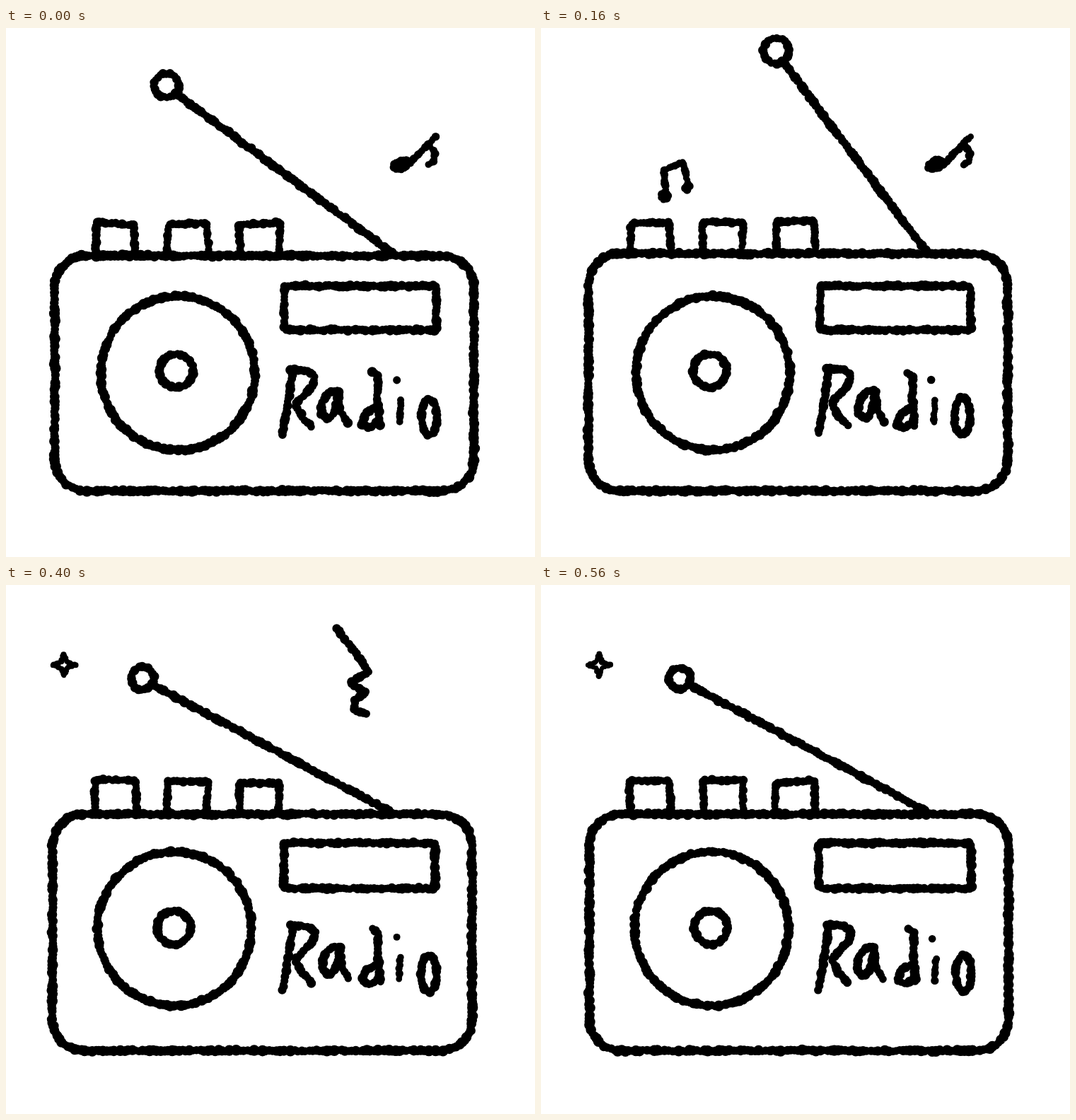
These frames come from a looping animation (748 px wide and 748 px high, 0.64 s). An HTML page with a canvas:

```html
<!DOCTYPE html>
<html lang="en">
<head>
<meta charset="utf-8">
<title>Radio</title>
<style>
html, body { margin: 0; width: 100%; height: 100%; overflow: hidden; background: #fff; }
canvas { display: block; width: 100vw; height: 100vh; }
</style>
</head>
<body>
<canvas id="stage" width="748" height="748"></canvas>
<script>
const ctx = document.getElementById("stage").getContext("2d");
const POSE_MS = 80, POSES = 8;

// Strokes of the hand lettering, each as x, y, x, y, ...
const LETTERS = [
  [[406, 486, 401, 520, 392, 574], [404, 482, 426, 483, 438, 491, 435, 504, 410, 531, 420, 549, 434, 564]],
  [[470, 512, 458, 514, 448, 529, 447, 545, 457, 553, 466, 543, 472, 513, 474, 540, 485, 558]],
  [[522, 537, 508, 545, 503, 560, 514, 565, 526, 557], [518, 486, 526, 492, 525, 520, 529, 566]],
  [[553, 499, 554, 502], [558, 528, 556, 560]],
  [oval(597, 550, 11, 26)]];

// Little marks: each pops up small, is full size at its peak pose, then shrinks.
const MARKS = [
  { peak: 1, x: 583, y: 178, draw: drawNote },
  { peak: 3, x: 191, y: 213, draw: drawBeamedNote },
  { peak: 5, x: 490, y: 120, draw: drawRest },
  { peak: 6, x: 82, y: 113, draw: drawStar }];

let seed = 1;
function random() {
  seed = (seed * 16807) % 2147483647;
  return seed / 2147483647;
}
const jitter = amount => (random() * 2 - 1) * amount;

function arc(cx, cy, rx, ry, from, to, steps) {
  const points = [];
  for (let i = 0; i <= steps; i++) {
    const angle = from + (to - from) * i / steps;
    points.push(cx + rx * Math.cos(angle), cy + ry * Math.sin(angle));
  }
  return points;
}
function oval(cx, cy, rx, ry = rx) {
  return arc(cx, cy, rx, ry, 0, Math.PI * 2, 48);
}
function roundedBox(left, top, right, bottom, r) {
  const q = Math.PI / 2;
  const corners = [[right - r, bottom - r], [left + r, bottom - r], [left + r, top + r], [right - r, top + r]];
  const points = corners.flatMap(([x, y], i) => arc(x, y, r, r, i * q, (i + 1) * q, 10));
  return [...points, points[0], points[1]];
}

// Stamps uneven round dabs along a polyline.
function brush(points, width, fill = false) {
  const step = width * 0.36;
  let ahead = 0;
  ctx.beginPath();
  for (let i = 0; i + 3 < points.length; i += 2) {
    const [x0, y0, x1, y1] = points.slice(i, i + 4);
    const length = Math.hypot(x1 - x0, y1 - y0);
    for (; ahead < length; ahead += step) {
      const x = x0 + (x1 - x0) * ahead / length + jitter(width * 0.07);
      const y = y0 + (y1 - y0) * ahead / length + jitter(width * 0.07);
      const radius = width * (0.47 + jitter(0.08));
      ctx.moveTo(x + radius, y);
      ctx.arc(x, y, radius, 0, Math.PI * 2);
    }
    ahead -= length;
  }
  ctx.fill();
  if (!fill) return;
  ctx.beginPath();
  for (let i = 0; i < points.length; i += 2) ctx.lineTo(points[i], points[i + 1]);
  ctx.fill();
}

// Mark shapes are given around their own centre; place() scales and moves them.
function drawNote(place, width) {
  const head = oval(0, 0, 21, 11), tilt = -0.35, tilted = [];
  for (let i = 0; i < head.length; i += 2) {
    const [x, y] = [head[i], head[i + 1]];
    tilted.push(x * Math.cos(tilt) - y * Math.sin(tilt) - 45, x * Math.sin(tilt) + y * Math.cos(tilt) + 28);
  }
  brush(place(tilted), width, true);
  brush(place([-21, 24, 46, -47]), width);
  brush(place([28, -26, 44, -2, 41, 18, 23, 31]), width);
}
function drawBeamedNote(place, width) {
  brush(place([-25, 42, -33, -21, 17, -44, 33, 21]), width);
  brush(place(oval(-30, 45, 8)), width, true);
  brush(place(oval(29, 23, 5)), width, true);
}
function drawRest(place, width) {
  brush(place([-22, -58, 0, -30, 23, 3, -3, 19, 20, 32, 3, 43, 3, 58, 21, 63]), width);
}
function drawStar(place, width) {
  const points = [];
  for (let i = 0; i <= 8; i++) {
    const reach = i % 2 ? 11 : 30;
    points.push(reach * Math.cos(i * Math.PI / 4), reach * Math.sin(i * Math.PI / 4));
  }
  brush(place(points), width * 0.7);
}

function drawMarks(pose) {
  for (const { peak, x, y, draw } of MARKS) {
    const distance = Math.abs(pose - peak);
    if (distance > 1) continue;
    const scale = distance ? 0.54 : 1;
    const place = points => points.map((value, i) => value * scale + (i % 2 ? y : x));
    draw(place, distance ? 11 : 12.5);
  }
}

// Swings evenly up and down; the raised rod looks a little shorter.
function drawAntenna(footX, footY, phase) {
  const swing = Math.asin(Math.sin(phase)) * 2 / Math.PI;
  const angle = (36.6 + 16.6 * swing) * Math.PI / 180;
  const length = 397 - 44 * Math.sqrt(Math.max(0, swing));
  const x = footX - length * Math.cos(angle), y = footY - length * Math.sin(angle);
  const radius = 17.5 + 4 * Math.min(0, swing);
  brush(oval(x, y, radius + jitter(1), radius + jitter(1)), 12.5);
  brush([x + radius * Math.cos(angle + 0.1), y + radius * Math.sin(angle + 0.1), footX, footY], 13.5);
}
function drawButtons(topY, footY) {
  for (let i = 0; i < 3; i++) {
    const left = 127 + 102 * i, right = left + 56;
    brush([left + jitter(2), footY, left + jitter(2), topY + jitter(3),
      right + jitter(2), topY + jitter(3), right + jitter(2), footY], 12.5);
  }
}
function drawLetters() {
  for (const strokes of LETTERS) {
    const shift = [jitter(1.5), jitter(1.5)];
    const width = strokes === LETTERS[3] ? 10.5 : 13;
    for (const stroke of strokes) brush(stroke.map((value, i) => value + shift[i % 2]), width);
  }
}

function draw(pose) {
  seed = 7919 * (pose + 1);
  ctx.fillStyle = "#fff";
  ctx.fillRect(0, 0, 748, 748);
  ctx.fillStyle = "#000";

  // The whole drawing drifts slightly from pose to pose.
  const phase = pose * Math.PI * 2 / POSES;
  const sway = Math.cos(phase), lift = Math.sin(phase), flip = pose % 2 ? 1 : -1;
  const top = 322 - 3 * lift;
  brush(roundedBox(67 + 2 * sway, top, 660 + 1.5 * sway, 656.5 + 2 * flip, 44), 14.2);
  brush(roundedBox(393.5 + lift, 364.7, 607.5 + sway, 428 + flip, 3), 13.5);
  brush(oval(241 + 2 * sway + 2 * lift, 487 - flip, 109), 14);
  brush(oval(239 + 2 * sway, 484.5, 23.5), 13.5);
  drawButtons(276 - 2 * lift, top - 6);
  drawAntenna(544 + 2 * sway, top - 4, phase);
  drawLetters();
  drawMarks(pose);
}

let shown = -1;
function tick() {
  const pose = Math.floor(performance.now() / POSE_MS) % POSES;
  if (pose !== shown) draw(shown = pose);
  requestAnimationFrame(tick);
}
tick();
</script>
</body>
</html>
```
